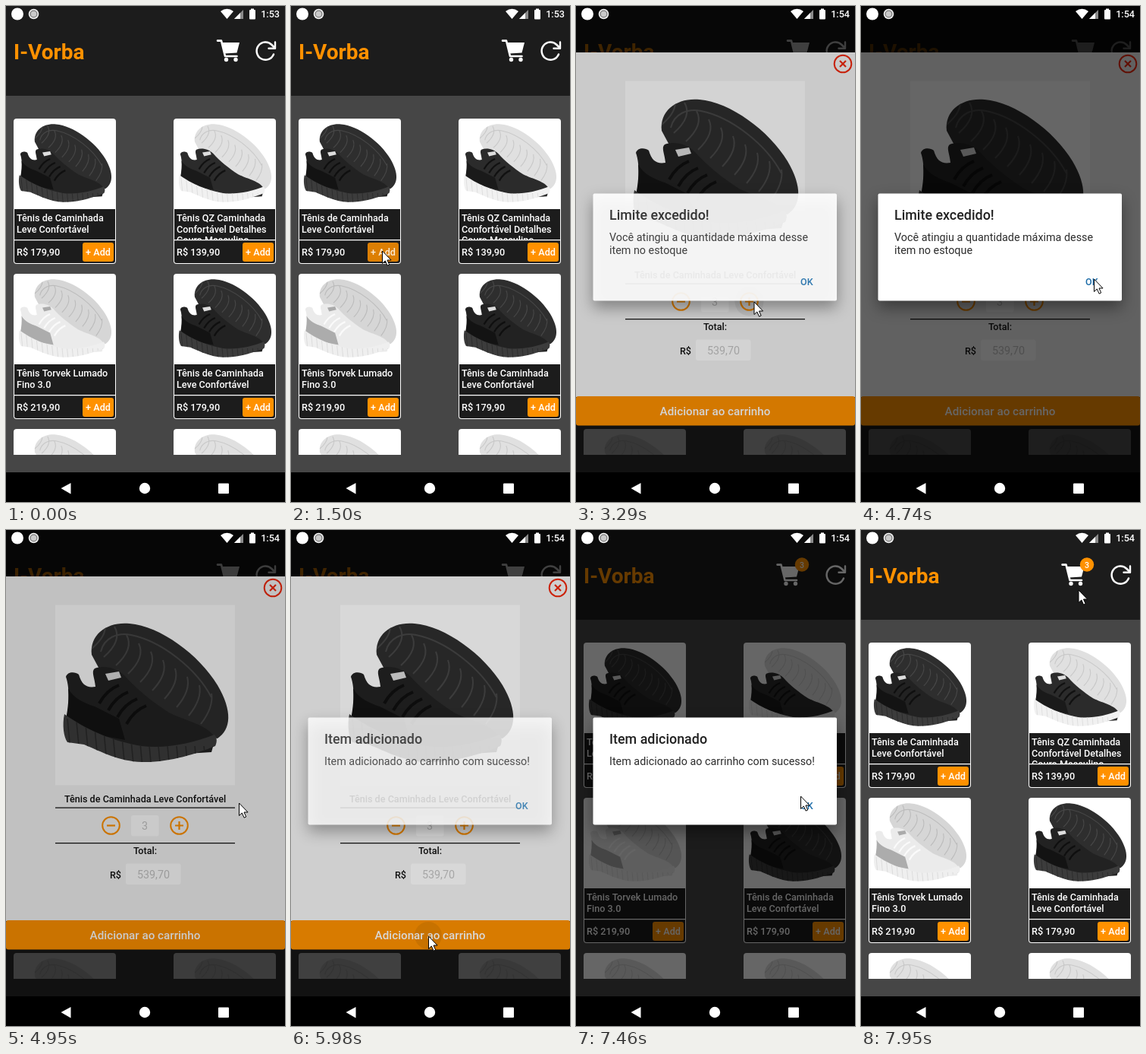
Recreate the animation shown at these times as an HTML page with a canvas. Size 368 by 652 pixels, loop 8 s.

```html
<!DOCTYPE html>
<html lang="pt-BR">
<head>
<meta charset="utf-8">
<title>Loja de tênis</title>
<style>
html, body { margin: 0; width: 100%; height: 100%; overflow: hidden; background: #000; }
canvas { display: block; width: 368px; height: 652px; }
</style>
</head>
<body>
<canvas id="stage"></canvas>
<script>
const W = 368, H = 652, LOOP = 8000;
const ORANGE = '#ff9100', DARK = '#1c1c1c', GREY = '#464646';
const canvas = document.getElementById('stage');
const ctx = canvas.getContext('2d');
const dpr = window.devicePixelRatio || 1;
canvas.width = W * dpr;
canvas.height = H * dpr;

// Times of the events, in ms
const OPEN = 1570, CLOSE = 6260, MINUTE = 2100, CLICKS = [2590, 2940, 3150], ADD = 5850;
const ALERTS = [
  { from: 3200, to: 4820, title: 'Limite excedido!', lines: ['Você atingiu a quantidade máxima desse', 'item no estoque'] },
  { from: 5900, to: 7540, title: 'Item adicionado', lines: ['Item adicionado ao carrinho com sucesso!'] }
];
// Pointer keys: time, x, y
const POINTER = [
  [110, 187, 624], [400, 150, 430], [620, 110, 310], [750, 103, 325], [950, 103, 325], [1020, 120.5, 322],
  [1970, 120.5, 322], [2430, 235, 389], [3450, 235, 389], [3570, 244, 373], [4000, 300, 326], [4180, 314, 348],
  [4340, 307.5, 359], [4960, 307.5, 359], [5560, 181.5, 534], [6300, 181.5, 534], [6900, 288, 366],
  [7250, 296.5, 350], [7520, 296.5, 350], [7740, 283, 166], [7950, 287, 79], [8000, 287, 79]
];

const clamp = v => Math.max(0, Math.min(1, v));
const between = (t, a, b) => t >= a && t < b;

function rect(x, y, w, h, fill, r = 0) {
  ctx.fillStyle = fill;
  ctx.beginPath();
  ctx.roundRect(x, y, w, h, r);
  ctx.fill();
}

function disc(x, y, r, fill) {
  ctx.fillStyle = fill;
  ctx.beginPath();
  ctx.arc(x, y, r, 0, 7);
  ctx.fill();
}

function poly(points, fill) {
  ctx.fillStyle = fill;
  ctx.beginPath();
  points.forEach(p => ctx.lineTo(p[0], p[1]));
  ctx.closePath();
  ctx.fill();
}

function stroke(d, color, width) {
  ctx.strokeStyle = color;
  ctx.lineWidth = width;
  ctx.stroke(new Path2D(d));
}

function fillPath(d, color) {
  ctx.fillStyle = color;
  ctx.fill(new Path2D(d));
}

function text(s, x, y, size, color, weight = 500, align = 'left') {
  ctx.font = `${weight} ${size}px Roboto, sans-serif`;
  ctx.textAlign = align;
  ctx.fillStyle = color;
  ctx.fillText(s, x, y);
}

function clipped(x, y, w, h, draw) {
  ctx.save();
  ctx.beginPath();
  ctx.rect(x, y, w, h);
  ctx.clip();
  draw();
  ctx.restore();
}

// Shoe pair, drawn in a square of side PHOTO
const PHOTO = 237;
const BLACK = { back: '#2e2e2e', tread: '#474747', upper: '#222', heel: '#131313', mid: '#3c3c3c', rib: '#2a2a2a', lace: '#0f0f0f', tag: '#ddd' };
const MIXED = { back: '#e0e0e0', tread: '#c9c9c9', upper: '#2b2b2b', heel: '#1a1a1a', mid: '#f1f1f1', rib: '#dcdcdc', lace: '#111', tag: '#ddd' };
const WHITE = { back: '#d6d6d6', tread: '#bcbcbc', upper: '#ebebeb', heel: '#acacac', mid: '#efefef', rib: '#d8d8d8', lace: '#fafafa', tag: '#aaa' };
const BACK = 'M48 66C45 38 70 22 98 25C138 28 190 66 214 106C234 140 232 164 214 176L140 160L62 92Z';
const UPPER = 'M14 95C16 88 26 88 31 92C35 106 42 110 53 108C52 96 47 88 52 84C66 79 82 84 92 94C106 110 128 128 150 142C174 154 202 158 211 176L206 194L110 200L14 164C18 140 20 112 14 95Z';
const SOLE = 'M12 144C9 158 11 174 16 181L38 184C62 194 84 206 114 207C150 208 186 196 211 186C214 180 213 174 210 171C182 182 146 190 114 186C76 180 40 164 12 144Z';

function shoe(c) {
  fillPath(BACK, c.back);
  ctx.save();
  ctx.clip(new Path2D(BACK));
  for (let i = 0; i < 10; i++) {
    const x = 62 + i * 16, y = 18 + i * 11;
    stroke(`M${x} ${y}q${12 - i} 18 -14 40`, c.tread, 2);
  }
  ctx.restore();
  stroke('M60 62C64 44 82 36 100 40C140 48 186 84 206 122', c.tread, 2);
  fillPath(UPPER, c.upper);
  fillPath('M17 110C24 124 40 130 52 134L84 150L92 178L60 172L14 150C17 136 18 122 17 110Z', c.heel);
  fillPath(SOLE, c.mid);
  ctx.save();
  ctx.clip(new Path2D(SOLE));
  for (let i = 0; i < 17; i++) stroke(`M${16 + i * 12} ${150 + Math.min(i, 9) * 4}l4 42`, c.rib, 1.5);
  ctx.restore();
  for (let i = 0; i < 4; i++) {
    stroke(`M${84 + i * 12} ${106 + i * 9}q-16 6 -26 24`, c.lace, 4);
  }
  poly([[66, 91], [84, 88], [87, 96], [70, 100]], c.tag);
}

// Scales the photo to cover the box, centred
function photo(style, x, y, w, h) {
  const scale = Math.max(w, h) / PHOTO;
  clipped(x, y, w, h, () => {
    ctx.translate(x + (w - PHOTO * scale) / 2, y + (h - PHOTO * scale) / 2);
    ctx.scale(scale, scale);
    shoe(style);
  });
}

const NAME = ['Tênis de Caminhada', 'Leve Confortável'];
const CARDS = [
  { style: BLACK, name: NAME, price: '179,90' },
  { style: MIXED, name: ['Tênis QZ Caminhada', 'Confortável Detalhes', 'Couro Masculino'], price: '139,90' },
  { style: WHITE, name: ['Tênis Torvek Lumado', 'Fino 3.0'], price: '219,90' },
  { style: BLACK, name: NAME, price: '179,90' },
  { style: MIXED, name: [], price: '' },
  { style: MIXED, name: [], price: '' }
];

function card(c, x, y, press) {
  rect(x, y, 135, 191, '#fff', 4);
  rect(x + 1, y + 119, 133, 71, DARK, [0, 0, 3, 3]);
  photo(c.style, x + 1, y + 1, 133, 118);
  clipped(x + 1, y + 119, 133, 40, () =>
    c.name.forEach((s, i) => text(s, x + 4, y + 135 + i * 14.7, 12.6, '#fff')));
  rect(x + 1, y + 159, 133, 1.2, '#fff');
  text('R$ ' + c.price, x + 4, y + 180, 12.7, '#fff');
  ctx.globalAlpha = 1 - 0.6 * press;
  rect(x + 91, y + 163, 41, 25, ORANGE, 3);
  text('+ Add', x + 111.5, y + 180, 12.6, '#fff', 500, 'center');
  ctx.globalAlpha = 1;
}

function cart(x) {
  ctx.save();
  ctx.translate(x, 44);
  stroke('M.5 1.6H5.5L10.5 22H26', '#fff', 2.6);
  poly([[6, 4], [29.5, 4], [26, 17.5], [9.5, 18.5]], '#fff');
  disc(12, 26.5, 2.7, '#fff');
  disc(24.5, 26.5, 2.7, '#fff');
  ctx.restore();
}

function home(t) {
  rect(0, 0, W, 613, GREY);
  rect(0, 0, W, 118, DARK);
  text('I-Vorba', 10, 70, 28, ORANGE, 700);
  const filled = t >= CLOSE;
  ctx.lineCap = 'round';
  ctx.lineJoin = 'round';
  cart(filled ? 265 : 278.5);
  stroke('M353 63.5A11.6 11.6 0 1 1 350.5 51L354.5 55', '#fff', 2.5);
  stroke('M355 47.5V55.7H346.5', '#fff', 2.4);
  ctx.lineCap = 'butt';
  ctx.lineJoin = 'miter';
  if (filled) {
    disc(298, 45.5, 9.2, ORANGE);
    text('3', 298, 49.5, 10.5, '#fff', 500, 'center');
  }
  const press = clamp((t - 1220) / 100) * clamp((1560 - t) / 240);
  clipped(0, 118, W, 472, () =>
    CARDS.forEach((c, i) => card(c, i % 2 ? 221 : 10, 148 + 204 * (i >> 1), i ? 0 : press)));
}

function ringIcon(x, y, color, d) {
  ctx.strokeStyle = color;
  ctx.lineWidth = 2;
  ctx.beginPath();
  ctx.arc(x, y, 11.3, 0, 7);
  ctx.stroke();
  stroke(d, color, 2.2);
}

function modal(t) {
  rect(0, 0, W, 613, 'rgba(0,0,0,.7)');
  rect(0, 61, W, 453, '#f4f4f4');
  rect(0, 513, W, 38.5, ORANGE, 3);
  if (between(t, ADD, 6150)) disc(181, 533, 18, 'rgba(0,0,0,.08)');
  text('Adicionar ao carrinho', 183.5, 538, 15.2, '#fff', 500, 'center');
  ringIcon(352, 76, '#f0280c', 'M348 72l8 8m0-8l-8 8');
  rect(65, 98.5, PHOTO, PHOTO, '#fff');
  photo(BLACK, 65, 98, PHOTO, PHOTO);
  text(NAME.join(' '), 183.5, 358, 12.6, '#111', 500, 'center');
  rect(65, 364.5, 237, 1.2, '#111');
  rect(65, 411, 237, 1.2, '#111');
  if (CLICKS.some(c => between(t, c - 40, c + 150))) disc(228.5, 388.5, 19, '#e5e5e5');
  ringIcon(138.5, 388.5, ORANGE, 'M133 388.5h11');
  ringIcon(228.5, 388.5, ORANGE, 'M223 388.5h11m-5.5-5.5v11');
  const qty = 1 + (t >= CLICKS[0]) + (t >= CLICKS[1]);
  rect(165, 375, 36.5, 27.5, '#fff', 3);
  text(qty, 183, 394, 14.3, '#c4c4c4', 400, 'center');
  text('Total:', 183.5, 426, 12.6, '#111', 500, 'center');
  text('R$', 137, 457.5, 12.6, '#111');
  rect(158, 438.5, 72.5, 27.5, '#fff', 3);
  text((179.9 * qty).toFixed(2).replace('.', ','), 194.5, 458, 14.3, '#c4c4c4', 400, 'center');
}

function alertBox(a, t) {
  if (!between(t, a.from, a.to + 200)) return;
  const dim = clamp((t - a.from) / 320) * clamp((a.to + 200 - t) / 200);
  const alpha = clamp((t - a.from) / 100) * clamp((a.to + 100 - t) / 100);
  rect(0, 0, W, 613, `rgba(0,0,0,${0.6 * dim})`);
  ctx.globalAlpha = alpha;
  ctx.shadowColor = 'rgba(0,0,0,.4)';
  ctx.shadowBlur = 20 * dpr;
  ctx.shadowOffsetY = 9 * dpr;
  rect(22.5, 246.5, 321.5, 141, '#fff', 2);
  ctx.shadowColor = 'transparent';
  text(a.title, 44, 281, 17.9, '#212121');
  a.lines.forEach((s, i) => text(s, 44, 309 + i * 17, 14.35, '#2c2c2c', 400));
  text('OK', 296, 367, 12.5, '#1c6ca8');
  ctx.globalAlpha = 1;
}

function systemBars(t) {
  disc(15, 10.5, 8, '#fff');
  disc(36.5, 10.5, 6.8, '#eee');
  disc(36.5, 10.5, 5, '#777');
  disc(36.5, 10.5, 3.8, '#c9c9c9');
  fillPath('M291.5 17L283 7Q291.5 0.5 300 7Z', '#fff');
  poly([[301, 17], [313, 17], [313, 5]], '#8a8a8a');
  poly([[301, 17], [309, 17], [309, 9]], '#fff');
  rect(321, 5, 8, 12.5, '#fff', 1);
  rect(323, 3.5, 4, 2, '#fff');
  text(t < MINUTE ? '1:53' : '1:54', 361, 15.3, 12.6, '#fff', 500, 'right');
  rect(0, 613, W, 39, '#000');
  poly([[72.5, 634], [85.5, 627], [85.5, 641.5]], '#fff');
  disc(183, 634, 7.2, '#fff');
  rect(280, 627.5, 14, 13.5, '#fff', 1);
}

function pointer(t) {
  if (t < POINTER[0][0]) return;
  const i = Math.max(1, POINTER.findIndex(k => k[0] > t));
  const [t0, x0, y0] = POINTER[i - 1], [t1, x1, y1] = POINTER[i];
  const p = clamp((t - t0) / (t1 - t0));
  ctx.save();
  ctx.translate(x0 + (x1 - x0) * p, y0 + (y1 - y0) * p);
  const arrow = 'M0 0V16.5L3.8 13L6.6 19.2L9.2 18L6.5 12H11.6Z';
  fillPath(arrow, '#fff');
  stroke(arrow, '#000', 1);
  ctx.restore();
}

function frame(now) {
  const t = now % LOOP;
  ctx.setTransform(dpr, 0, 0, dpr, 0, 0);
  home(t);
  if (between(t, OPEN, CLOSE)) modal(t);
  ALERTS.forEach(a => alertBox(a, t));
  systemBars(t);
  pointer(t);
  requestAnimationFrame(frame);
}
requestAnimationFrame(frame);
</script>
</body>
</html>
```
